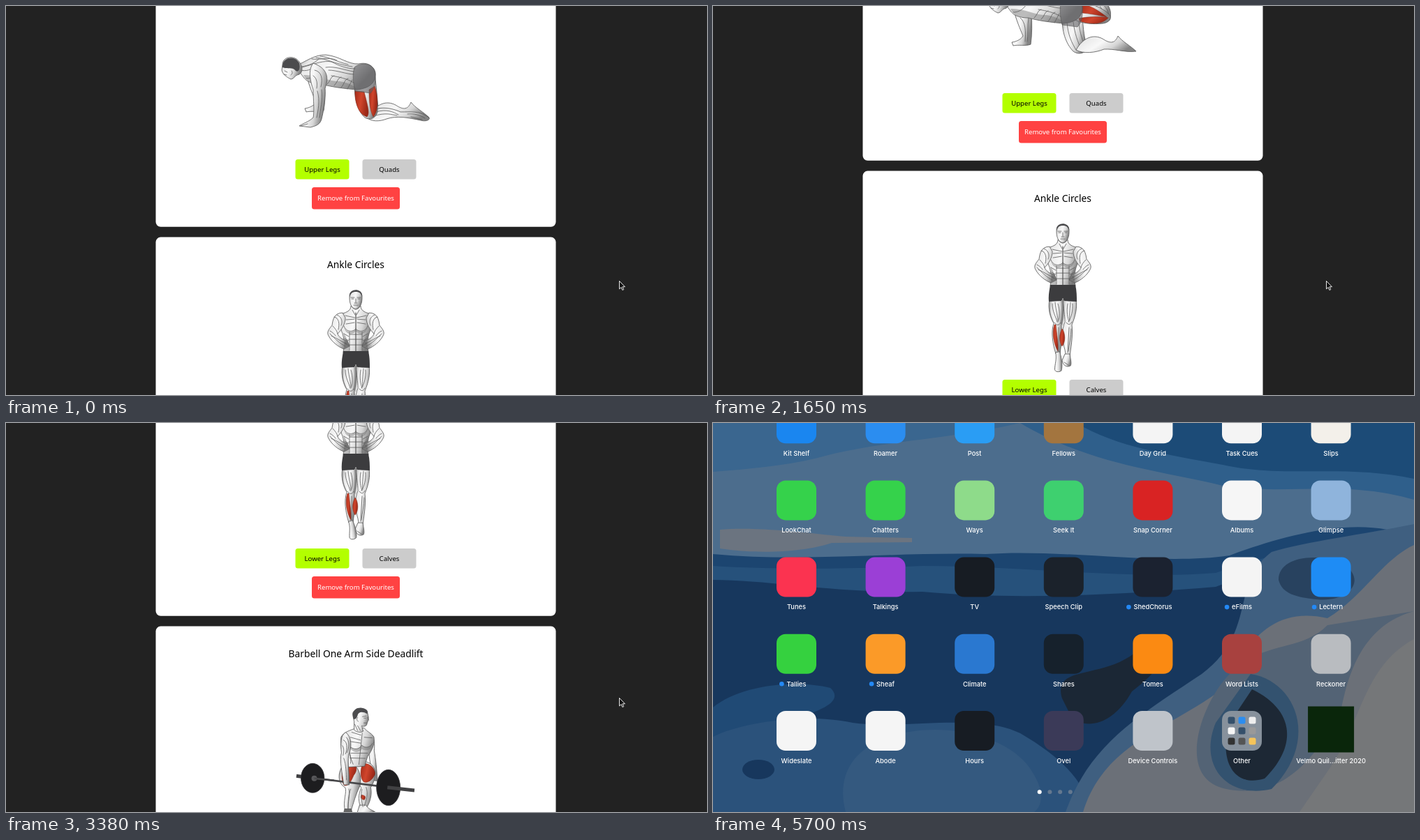
Animation, 1004 px wide and 558 px high, one loop 6200 ms. Source, as an HTML page:

```html
<!DOCTYPE html>
<html lang="en">
<head>
<meta charset="utf-8">
<title>Favourite exercises</title>
<style>
html, body { margin: 0; width: 100%; height: 100%; overflow: hidden; background: #222; }
svg { display: block; width: 1004px; height: 558px; }
text { text-anchor: middle; }
.title { font: 13.8px "Noto Sans", sans-serif; }
.button { font: 9.6px "Noto Sans", sans-serif; }
.label { font: 500 9.3px Inter, sans-serif; fill: #fff; }
.skin { fill: url(#skin); stroke: #555; stroke-width: .8; }
.line { fill: none; stroke: #5c5c5c; stroke-width: .8; stroke-linecap: round; }
.shade { fill: #6a6a6a; fill-opacity: .42; }
.red { fill: url(#red); stroke: #7d2415; stroke-width: .5; }
.dark { fill: #3c3c3e; }
.hair { fill: #4c4c4e; }
.grey { fill: #626264; fill-opacity: .6; stroke: #555; stroke-width: .6; }
.foot { fill: #666; stroke: #444; stroke-width: .6; }
.plate { fill: #1d1d1f; stroke: #343436; stroke-width: .8; }
.hub { fill: #58585a; }
.bar { fill: none; stroke: #48484a; stroke-width: 2.6; }
.sleeve { fill: none; stroke: #414143; stroke-width: 5; }
</style>
</head>
<body>
<svg id="stage" viewBox="0 0 1004 558">
  <defs>
    <linearGradient id="skin" x2="1" y2=".4">
      <stop stop-color="#8c8c8c"/><stop offset=".22" stop-color="#e9e9e9"/><stop offset=".5" stop-color="#f8f8f8"/>
      <stop offset=".75" stop-color="#d6d6d6"/><stop offset="1" stop-color="#848484"/>
    </linearGradient>
    <linearGradient id="red" x2="1" y2=".3">
      <stop stop-color="#a52c19"/><stop offset=".5" stop-color="#d0452c"/><stop offset="1" stop-color="#9b2817"/>
    </linearGradient>
  </defs>
  <rect width="1004" height="558" fill="#222"/>
  <g id="page"></g>
  <path id="cursor" d="M0 0V11.4L2.7 9L4.4 13L6.2 12.2L4.5 8.3H8Z" fill="#111" stroke="#fff" stroke-width=".9"/>
  <g id="launcher"></g>
</svg>
<script>
const LOOP = 6200, PITCH = 411, TOP = -79.4;
const $ = id => document.getElementById(id);
const NUMBER = /-?\d+(\.\d+)?/g;

const morph = (a, b, p) => {
  const ends = b.match(NUMBER);
  let i = 0;
  return a.replace(NUMBER, v => +(+v + (ends[i++] - v) * p).toFixed(2));
};
const shift = (d, dx, dy) => {
  let i = 0;
  return d.replace(NUMBER, v => +v + (i++ % 2 ? dy : dx));
};
const oval = (x, y, rx, ry) =>
  `M${x - rx} ${y}a${rx} ${ry} 0 1 0 ${2 * rx} 0a${rx} ${ry} 0 1 0 ${-2 * rx} 0Z`;
const ease = (t, from, to) => {
  const u = Math.min(1, Math.max(0, (t - from) / (to - from)));
  return u * u * (3 - 2 * u);
};

// Parts are [class, path] or [class, path at rest, path at full reach].
const kickback = [
  ['skin', 'M430 98C434 115 440 128 444 138C440 144 434 146 428 147L430 152C437 150 448 153 455 150C457 136 457 120 456 104Z'],
  ['line', 'M440 112C448 118 448 132 447 146M452 112C450 124 452 136 450 146'],
  ['skin', 'M501 108C498 130 506 150 516 160C524 166 534 162 536 156C532 142 530 128 529 108Z'],
  ['line', 'M507 118C508 136 514 148 520 158M516 118C518 134 522 146 528 158M524 118C525 134 530 146 533 154'],
  ['skin', 'M520 158C530 140 545 135 558 142C570 150 576 148 580 138C586 146 598 152 606 160C590 162 575 156 560 157C548 162 530 164 520 158Z'],
  ['skin', 'M518 152C535 143 552 146 565 152C580 152 592 150 606 160C608 164 600 166 594 164C575 160 560 157 545 162C535 166 522 166 518 160Z',
    'M572 112C576 98 566 86 556 80C550 72 545 62 538 58C534 60 532 64 534 68C540 76 546 88 550 94C556 104 562 110 568 114Z'],
  ['line', 'M530 152C545 147 555 152 562 156M526 158C545 152 552 156 560 157M575 155C585 154 592 156 600 161M580 159L596 163',
    'M570 104C566 92 558 88 552 82M566 107C560 98 556 92 550 86M550 76C546 70 542 66 538 62M546 80L537 67'],
  ['skin', 'M500 100C497 125 502 150 514 160C522 165 530 160 532 152C533 135 530 115 528 96Z',
    'M504 98C510 116 535 120 560 117C568 116 574 112 572 106C566 98 545 88 514 86Z'],
  ['red', 'M500 122C499 140 506 156 517 159C522 154 517 140 513 123Z', 'M526 112C540 108 555 106 570 108C560 120 540 120 526 116Z'],
  ['red', 'M520 120C520 135 521 150 526 159C534 150 533 130 528 115Z', 'M529 90C545 92 555 98 567 107C555 105 540 104 527 104Z'],
  ['skin', 'M414 86C430 80 440 70 458 70C478 72 490 84 505 83C518 80 528 86 529 98C528 112 520 118 502 120C480 118 466 116 452 112C438 112 430 108 426 102Z'],
  ['shade', 'M426 99C445 98 460 108 478 108C488 110 496 112 502 119C480 119 462 115 452 112C438 112 430 108 426 99Z'],
  ['grey', 'M499 88C508 80 526 82 529 95C530 110 528 118 522 125L500 122C497 110 496 98 499 88Z'],
  ['line', 'M424 88C445 82 455 78 466 80C478 86 488 90 500 90M438 76C450 78 462 72 474 78M462 92C474 92 488 98 498 98M458 88C472 86 484 92 498 94M460 112C466 106 464 102 470 100M470 114C476 108 474 104 480 102M480 117C486 110 484 106 490 104M489 119L496 106'],
  ['line', 'M418 88C430 86 440 84 448 76M421 92C430 94 438 92 444 84M450 72C462 73 474 80 490 84M444 74C460 76 474 84 496 87M466 100C478 102 488 104 498 110M430 104C438 104 444 100 448 94'],
  ['skin', 'M440 82C432 92 436 108 440 120C440 135 442 150 440 160C434 166 426 168 420 172L436 174C444 172 450 170 452 162C456 146 458 130 457 118C462 104 462 90 440 82Z',
    'M448 86C450 96 466 94 476 88C490 86 510 78 524 74C530 74 536 74 542 70L538 62C530 64 524 66 518 70C500 70 488 72 474 72C462 68 450 74 448 86Z'],
  ['line', 'M442 92C452 94 454 104 451 116M446 122C450 136 447 150 445 160M452 120C454 134 450 150 449 160M440 100C446 104 446 112 445 118M422 172L432 169',
    'M456 82C464 78 472 80 478 80M484 80C498 76 508 76 520 72M484 84C498 80 510 76 522 73M460 76C468 74 474 76 480 76M530 70L540 66'],
  ['skin', 'M396 84C396 74 408 71 416 76C424 82 427 94 420 98C412 100 414 104 408 105C402 102 396 98 395 92Z'],
  ['hair', 'M396 88C395 73 414 70 420 82C422 90 419 96 415 93C411 87 403 91 396 88Z'],
  ['line', 'M399 93L403 95M398 98L402 99M409 93C411 95 410 98 408 99']
];

const half = [
  ['skin', 'M482 210C470 210 468 220 467 228C462 234 459 238 462 243C466 251 476 259 484 262L492 258L489 250C482 249 476 244 475 240C481 234 486 226 486 217Z'],
  ['shade', 'M484 230C487 239 497 239 501 233L501 236C497 243 486 242 484 230Z'],
  ['shade', 'M483 238C488 246 491 254 492 266L483 266C485 256 485 248 483 238Z'],
  ['line', 'M484 229C487 238 497 238 501 233M501 210V265M492 241H501M491 248H501M491 256H501M492 238V264M484 240L491 244M485 247L491 250M485 254L491 257'],
  ['line', 'M470 216C477 217 478 226 476 234M474 213C482 216 482 224 480 228M468 229C472 233 474 236 475 240M464 236C468 238 470 240 472 243M466 243C474 246 480 252 488 254M464 240C472 248 478 254 486 258M486 214L500 217M487 220L499 219M487 226L499 224M496 206L500 213']
];
const torso = ['skin', 'M494 200C494 208 486 210 478 212C475 222 479 232 482 240C485 250 484 258 483 267L519 267C518 258 517 250 520 240C523 232 527 222 524 212C516 210 508 208 508 200Z'];
const circles = [
  ['skin', 'M501 286C502 300 504 308 504 318C499 330 500 345 504 358L506 370L511 370C512 355 516 340 514 322C519 310 522 298 520 286Z'],
  ['skin', 'M504 364L500 373C501 380 506 384 512 381C514 378 512 371 511 364Z'],
  ['skin', 'M482 286C479 300 484 312 488 320C484 332 486 348 491 364L497 364C499 350 500 335 499 322C502 310 502 298 501 286Z'],
  ['shade', 'M498 288C500 300 499 312 497 320L501 324C504 310 504 298 501 288ZM482 292C482 304 486 314 489 320L486 318C481 308 480 300 482 292Z'],
  ['red', 'M489 322C485 334 488 350 494 360C495 350 492 334 491 322Z'],
  ['red', 'M500 328C495 336 496 348 500 353C505 348 505 334 500 328Z'],
  ['line', 'M486 292C486 304 491 310 493 318M490 290C491 302 494 310 494 316M494 292C497 302 497 312 494 318M508 292C506 304 508 312 510 318M512 290C511 302 510 310 511 316M515 292C516 302 513 312 509 318M489 319C492 324 496 323 498 319M506 319C509 323 512 322 514 318M510 326L508 362M513 328C513 340 510 350 509 360M495 326L495 360M503 376L509 380'],
  ['dark', 'M483 265L519 265C521 274 521 282 521 289L503 288L501 284L499 288L481 289C480 280 482 272 483 265Z'],
  ['skin', 'M492 188C491 175 511 175 510 188C510 196 508 203 501 205C494 203 492 196 492 188Z'],
  ['hair', 'M492 187C490 174 512 174 510 187C508 181 505 180 501 180C497 180 494 181 492 187Z'],
  ['line', 'M494 188H499M503 188H508M495 190H498M504 190H507M501 190V195M499 196H503M498 199H504M495 201C498 206 504 206 507 201']
];

const headD = 'M489 226C488 216 510 214 511 227C513 233 510 236 509 241C506 244 503 243 502 242L504 250C499 253 493 250 491 248L491 236Z';
const hairD = 'M490 232C486 217 499 214 507 218C511 220 511 223 510 225C503 221 497 222 496 227C495 231 492 234 490 232Z';
const faceD = 'M503 229L508 228M505 231L508 231M510 230L512 234M505 238L509 238M496 230C494 232 495 235 497 236M496 242L500 249M492 240L496 249';
const low = d => shift(d, 13, 69);
const deadlift = [
  ['skin', 'M524 322C531 326 531 340 529 348C530 360 532 380 535 396L530 396C526 382 522 366 521 350Z',
    'M517 253C523 256 525 268 525 276C529 288 530 300 528 313L523 312C521 300 519 290 518 280Z'],
  ['skin', 'M492 362C510 352 530 352 534 364C534 372 530 376 527 380C529 386 527 394 520 402L512 402C507 396 508 386 513 378C506 376 498 376 492 372Z',
    'M500 302C512 300 520 306 521 325C522 340 520 350 516 358C518 370 516 385 511 398L505 398C500 388 499 374 503 362C505 350 504 330 500 318Z'],
  ['skin', 'M508 396L519 396C521 402 526 402 530 406C522 409 512 410 503 407Z',
    'M504 396L511 396C515 403 524 404 530 408C522 411 510 410 503 407Z'],
  ['skin', 'M488 356C470 362 468 378 484 380C496 380 484 394 486 404L495 404C500 396 506 386 514 376C516 364 504 354 488 356Z',
    'M485 302C480 325 482 345 488 358C479 370 479 388 485 404L493 404C495 388 494 372 497 358C503 340 504 322 503 304Z'],
  ['foot', 'M485 401L495 401C497 408 499 411 497 415C490 417 484 415 482 412Z',
    'M485 402L494 402C495 410 497 413 494 416C488 418 483 417 482 414Z'],
  ['red', 'M482 364C478 368 478 376 482 378C488 378 490 374 496 370C506 366 506 360 498 358Z',
    'M487 306C482 325 484 345 488 354C496 356 500 345 501 330C501 318 498 308 495 306Z'],
  ['red', 'M508 358C505 362 507 368 514 370C522 372 532 366 534 366C533 358 518 352 508 358Z',
    'M514 308C510 325 507 340 509 352C514 358 520 345 521 330C521 318 518 310 514 308Z'],
  ['red', 'M512 384C510 388 512 390 517 390C520 387 520 384 512 384Z', 'M505 378C503 381 505 386 508 386C510 382 508 379 505 378Z'],
  ['line', 'M492 382C494 388 490 396 490 402M520 378C524 386 520 392 517 398M500 378C496 386 494 394 492 402M514 380C512 388 514 394 515 400',
    'M490 360C492 372 489 386 490 400M510 360C513 372 510 386 508 396M485 366C482 376 484 390 487 402M504 364C502 374 503 386 506 396'],
  ['skin', 'M505 314C496 318 488 320 484 328C482 342 484 350 486 358L486 366L512 362L520 352C528 344 533 336 531 328C527 322 521 320 517 314Z',
    'M495 246C486 250 478 250 474 258C474 272 482 280 484 290L483 308L516 310L515 290C520 280 523 266 521 256C517 250 511 251 508 246Z'],
  ['shade', 'M494 340C500 347 508 346 513 339C518 344 525 342 529 336C526 348 518 346 513 344C506 352 498 350 494 340Z',
    'M488 270C494 277 502 276 505 270C510 275 516 274 519 268C518 280 510 279 505 276C500 282 490 280 488 270Z'],
  ['line', 'M494 340C500 347 508 346 513 339C518 344 525 342 529 336M514 322L508 362M497 350L519 350M495 356L514 357M499 320L512 324M493 344L498 360M497 328L511 332M496 334L511 336M517 328L528 328M490 346C494 350 494 356 494 362',
    'M488 270C494 277 502 276 505 270C510 275 516 274 519 268M505 252L502 304M490 282L516 282M489 290L515 290M490 252L503 256M486 284L496 306M488 258L503 262M488 264L504 267M508 258L519 260M491 276C494 282 494 292 493 300'],
  ['skin', low(headD), headD],
  ['hair', low(hairD), hairD],
  ['line', low(faceD), faceD],
  ['bar', 'M419 381L588 411', 'M413 317L580 325'],
  ['sleeve', 'M418 381L426 382.5', 'M413 317L419 317.3'],
  ['plate', oval(441.5, 385.5, 16.5, 21), oval(436, 318, 17, 21)],
  ['hub', oval(444, 386, 4, 4), oval(438, 318.5, 4, 4)],
  ['bar', 'M444 386L470 390', 'M438 318.5L470 320'],
  ['plate', oval(551, 405, 17, 26), oval(543, 323.5, 17, 25)],
  ['sleeve', 'M550 405L588.5 411', 'M541 323.2L580 325'],
  ['skin', 'M491 321C483 326 484 338 485 350C481 362 485 380 488 398L495 397C495 380 492 366 494 354C499 344 500 328 491 321Z',
    'M480 251C472 255 472 268 474 280C472 292 477 308 478 324L487 325C488 308 485 296 486 284C490 272 490 256 480 251Z'],
  ['line', 'M488 332C493 334 493 344 490 352M488 358C491 368 491 380 491 390M486 340C489 344 488 350 487 354M492 328C497 334 495 344 492 350',
    'M477 262C483 264 484 274 481 282M478 288C482 298 482 308 483 318M476 270C479 274 478 280 477 284M481 258C487 264 486 274 483 280']
];

const moving = [];
const build = (parts, pose) => parts.map(([kind, from, to]) => {
  if (to) moving.push({ from, to, pose });
  return `<path class="${kind}" d="${from}"${to ? ' data-move' : ''}/>`;
}).join('');

const ankleFigure = () => {
  const side = build(half);
  return build([torso]) + side + `<g transform="matrix(-1 0 0 1 1002 0)">${side}</g>` + build(circles) +
    '<path id="toe" class="skin" d="M491 361C491 372 487 378 485 387C485 391 490 393 494 391C497 385 498 374 497 361Z"/>';
};

const button = (x, y, w, h, fill, text, ink = '#000') =>
  `<rect x="${x}" y="${y}" width="${w}" height="${h}" rx="3.5" fill="${fill}"/>
   <text class="button" x="${x + w / 2}" y="${y + h / 2 + 3.6}" fill="${ink}">${text}</text>`;

const card = (i, title, area, muscle, figure, figureTop) =>
  `<g transform="translate(0 ${TOP + i * PITCH})">
    <rect x="214.5" width="573" height="396.2" rx="7" fill="#fff"/>
    <text class="title" x="501" y="44">${title}</text>
    <g transform="translate(0 ${-figureTop})">${figure}</g>
    ${button(414.5, 299.5, 77, 28.5, '#b3ff00', area)}
    ${button(510.5, 299.5, 77, 28.5, '#ccc', muscle)}
    ${button(438, 339.3, 126, 31.5, '#ff4242', 'Remove from Favourites', '#fff')}
  </g>`;

$('page').innerHTML =
  card(0, '', 'Upper Legs', 'Quads', build(kickback, 'lift'), TOP) +
  card(1, 'Ankle Circles', 'Lower Legs', 'Calves', ankleFigure(), 101.5) +
  card(2, 'Barbell One Arm Side Deadlift', 'Upper Legs', 'Glutes', build(deadlift, 'rise'), 139.5) +
  `<rect x="214.5" y="${TOP + 3 * PITCH}" width="573" height="396" rx="7" fill="#fff"/>`;
document.querySelectorAll('[data-move]').forEach((el, i) => { moving[i].el = el; });

const wallpaper = [
  ['#17375d', 'M0 0H1004V558H0Z'],
  ['#26517b', 'M0 0H1004V240C900 150 800 205 720 235C600 245 440 255 300 242C180 245 80 225 0 225Z'],
  ['#1c4570', 'M0 0H1004V215C900 150 800 190 720 215C600 225 440 205 300 205C180 210 80 210 0 205Z'],
  ['#4c6d8d', 'M0 0H1004V165C930 130 820 160 740 190C640 205 500 180 390 188C250 185 130 200 0 188Z'],
  ['#3a668f', 'M0 0H440C330 25 240 25 150 50C100 62 50 66 0 70Z'],
  ['#2f5f8b', 'M440 0H1004V110C900 80 820 105 730 90C640 68 540 60 440 0Z'],
  ['#1c4b77', 'M520 0H1004V80C900 58 820 80 730 60C650 45 580 35 520 0Z'],
  ['#6b7480', 'M10 153C70 148 150 160 190 163L285 165V171L170 172C130 186 60 188 10 180Z'],
  ['#204a75', 'M0 408C40 375 120 368 168 380C190 400 150 415 110 425C70 440 30 440 0 450Z'],
  ['#2b527b', 'M0 450C40 430 130 415 200 430C270 440 380 415 440 445C500 480 540 520 535 558H0Z'],
  ['#34597f', 'M215 470C270 425 400 430 450 490C480 530 470 550 460 558H190C180 520 190 490 215 470Z'],
  ['#17375d', oval(65, 497, 23, 14)],
  ['#3f5f80', 'M1004 145C930 160 850 170 800 185C740 230 780 300 700 360C610 420 540 460 505 558H1004Z'],
  ['#6b7078', 'M1004 175C960 195 930 250 880 280C790 260 760 330 725 385C650 440 560 460 530 558H1004Z'],
  ['#536375', 'M1004 270C930 290 910 360 900 410C860 490 810 540 735 525C660 510 700 400 740 360C790 310 840 330 880 290Z'],
  ['#757779', 'M1004 310C930 350 930 430 880 500L840 558H1004Z'],
  ['#28425f', 'M810 225C810 195 855 185 900 200C940 225 910 258 865 253C835 250 815 245 810 225Z'],
  ['#33526f', 'M770 360C835 370 870 455 800 525C735 540 695 490 720 430Z'],
  ['#1d2835', 'M772 382C830 410 840 460 790 510C740 525 725 475 740 430Z'],
  ['#1b2735', 'M500 395C485 345 560 370 610 325C655 310 660 340 600 385C575 430 540 440 515 425Z']
];

// Labels starting with "*" carry a blue dot.
const apps = [
  'Kit Shelf #1a86f0,Roamer #2b8df0,Post #2a9df4,Fellows #a3753f,Day Grid #f4f4f4,Task Cues #f4f4f4,Slips #f3f0ea',
  'LookChat #35d24b,Chatters #35d24b,Ways #8edb8a,Seek It #3ed06f,Snap Corner #d92323,Albums #f6f6f6,Glimpse #8fb4dc',
  'Tunes #fb3350,Talkings #9b3fd6,TV #171c23,Speech Clip #1b222b,*ShedChorus #1b2230,*eFilms #f4f4f4,*Lectern #1e8cf5',
  '*Tallies #35d13f,*Sheaf #fb9a28,Climate #2a78d0,Shares #16212c,Tomes #fb8a12,Word Lists #a8413f,Reckoner #b9bcc0',
  'Wideslate #f5f5f5,Abode #f5f5f5,Hours #171c23,Ovel #3b3a58,Device Controls #bfc4ca,Other #87919c,Velmo Quil...itter 2020 #0a260b'
];
const folderTints = ['#35506b', '#2b8df0', '#eee', '#f5f5f5', '#35506b', '#999', '#333', '#555', '#f5c45a'];

const icon = (entry, col, row) => {
  const [, dot, name, color] = entry.match(/^(\*?)(.+) (#\w+)$/);
  const x = 119.5 + col * 127.6, y = 0.7 + row * 110.2;
  const last = row === 4 && col === 6, s = last ? 66 : 57;
  let out = `<rect x="${x - s / 2}" y="${y - s / 2 - (last ? 2 : 0)}" width="${s}" height="${s}" rx="${last ? 0 : 13}" fill="${color}"/>`;
  if (name === 'Other') folderTints.forEach((tint, i) => {
    out += `<rect x="${x - 20 + i % 3 * 15}" y="${y - 20 + (i / 3 | 0) * 15}" width="10" height="10" rx="2.5" fill="${tint}"/>`;
  });
  return out + `<text class="label" x="${x}" y="${y + 46.3}"${dot && ' data-dot'}>${name}</text>`;
};

$('launcher').innerHTML =
  wallpaper.map(([fill, d]) => `<path fill="${fill}" d="${d}"/>`).join('') +
  apps.map((line, row) => line.split(',').map((entry, col) => icon(entry, col, row)).join('')).join('') +
  [0, 1, 2, 3].map(i => `<circle cx="${467.7 + i * 14.7}" cy="529.3" r="3" fill="${i ? '#64788f' : '#fff'}"/>`).join('');
document.querySelectorAll('[data-dot]').forEach(label => {
  const x = label.getAttribute('x') - label.getComputedTextLength() / 2 - 7;
  label.insertAdjacentHTML('beforebegin', `<circle cx="${x}" cy="${label.getAttribute('y') - 3.3}" r="3.3" fill="#2489f5"/>`);
});

// The picture updates at these moments and holds in between.
const run = (from, count) => Array.from({ length: count }, (_, i) => from + i * 150);
const ticks = [...run(0, 10), ...run(1650, 6), 2580, ...run(3030, 5), 3890, ...run(4640, 5), 5700];

const render = t => {
  const scroll = 86 * ease(t, 0, 1350) + 255 * ease(t, 1530, 2580) + 262 * ease(t, 2880, 3890);
  $('page').setAttribute('transform', `translate(0 ${-Math.round(scroll)})`);

  const poses = {
    lift: ease(t, 0, 900) - ease(t, 1500, 2400),
    rise: ease(t, 2880, 3890) - ease(t, 4490, 5240)
  };
  for (const { el, from, to, pose } of moving) el.setAttribute('d', morph(from, to, poses[pose]));

  const turn = (1 + Math.cos((t - 844) / 2990 * 2 * Math.PI)) / 2;
  $('toe').setAttribute('transform',
    `translate(494 363) rotate(${-25 * turn}) scale(1 ${1 - .2 * turn}) translate(-494 -363)`);

  const away = ease(t, 4490, 5090);
  $('cursor').setAttribute('transform', `translate(${878.5 + 91 * away} ${394.5 + 35 * away})`);
  $('cursor').style.visibility = t < 5240 ? 'visible' : 'hidden';
  $('launcher').style.visibility = t < 5700 ? 'hidden' : 'visible';
};

const start = performance.now();
let shown = -1;
const frame = () => {
  const now = (performance.now() - start) % LOOP;
  const tick = ticks.findLast(v => v <= now);
  if (tick !== shown) render(shown = tick);
  requestAnimationFrame(frame);
};
frame();
</script>
</body>
</html>
```
